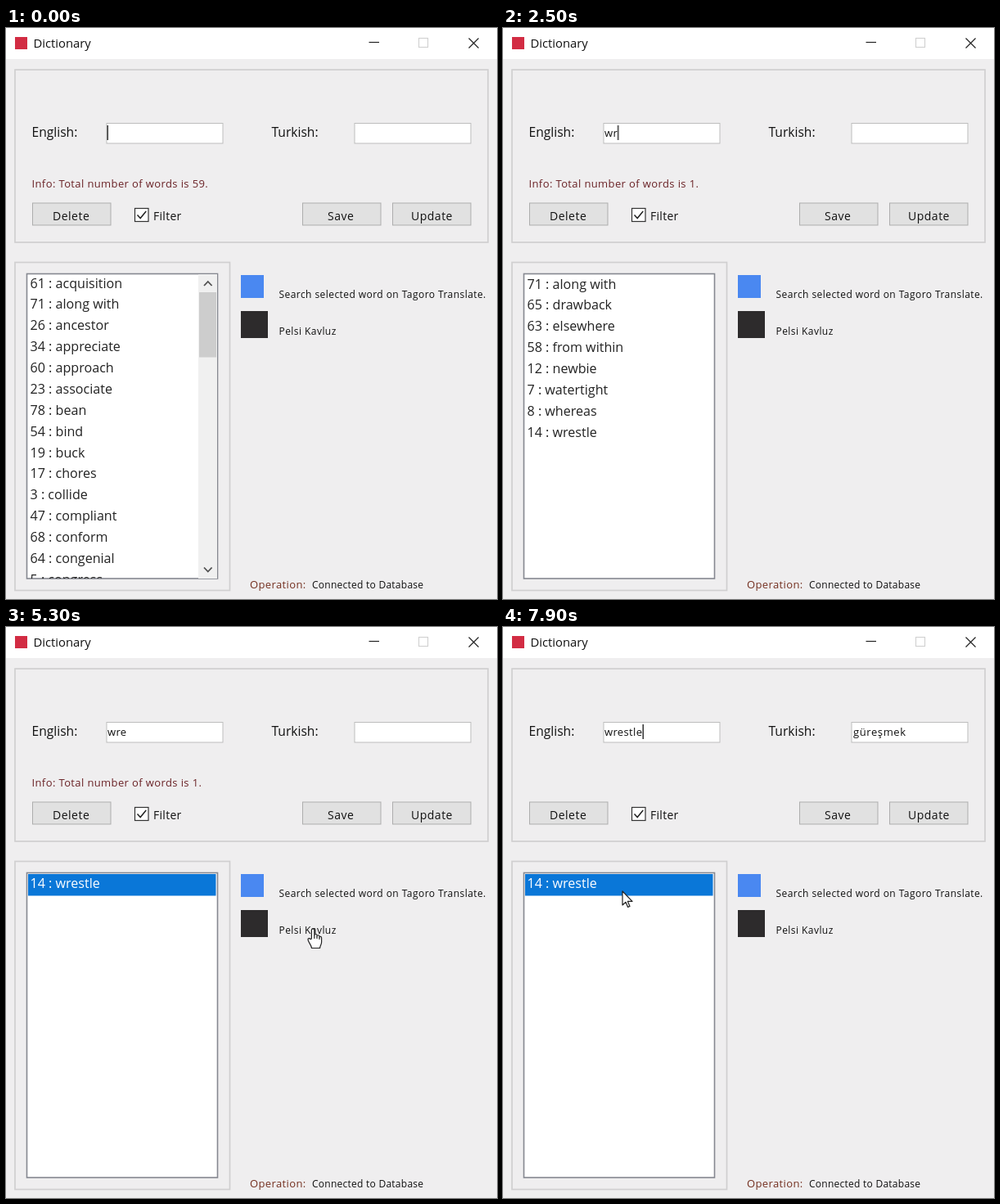
These frames come from a looping animation (600x698 px, 8 s). An HTML page:

```html
<!DOCTYPE html>
<html lang="en">
<head>
<meta charset="utf-8">
<title>Dictionary</title>
<style>
html, body { margin: 0; width: 100%; height: 100%; overflow: hidden; background: #efeeef; }
svg { display: block; width: 600px; height: 698px; }
text { font: 500 14px "Open Sans", "Noto Sans", sans-serif; fill: #111; }
.title { font-size: 14.8px; font-weight: 400; }
.label { font-size: 15.6px; }
.field { font-size: 13px; letter-spacing: .35px; }
.turkish { letter-spacing: .6px; }
.info { font-size: 13px; letter-spacing: .38px; fill: #6a2226; }
.operation { fill: #743020; }
.link { font-size: 12px; letter-spacing: .44px; }
.status { font-size: 12px; letter-spacing: .26px; }
.caption { letter-spacing: .5px; }
.check { letter-spacing: .3px; }
.rows text { font-size: 16.1px; font-weight: 400; fill: #222; }
.rows .on { fill: #fff; }
.panel { fill: none; stroke: #d0cfd0; stroke-width: 1.7; }
.input { fill: #fff; stroke: #bdbdbd; }
.button { fill: #e1e1e1; stroke: #adadad; }

/* Every clock runs 8 s; 1.25% is 100 ms */
.step { animation: 8s step-end infinite; }
.until-w { animation-name: until-w; }
.type-w { animation-name: type-w; }
.type-wr { animation-name: type-wr; }
.type-wre { animation-name: type-wre; }
.loaded { animation-name: loaded; }
.count-w { animation-name: count-w; }
.count-wr { animation-name: count-wr; }
.list-w { animation-name: list-w; }
.list-wr { animation-name: list-wr; }
.selected { animation-name: selected; }
.caret { animation-name: caret; }
.hand { animation-name: hand; }
.arrow { animation-name: arrow; }
.pointer { animation: move 8s linear infinite; }

@keyframes until-w { 0% { opacity: 1 } 25%, 100% { opacity: 0 } }
@keyframes type-w { 0% { opacity: 0 } 22.5% { opacity: 1 } 28.75%, 100% { opacity: 0 } }
@keyframes type-wr { 0% { opacity: 0 } 28.75% { opacity: 1 } 35%, 100% { opacity: 0 } }
@keyframes type-wre { 0% { opacity: 0 } 35% { opacity: 1 } 92.5%, 100% { opacity: 0 } }
@keyframes loaded { 0% { opacity: 0 } 92.5%, 100% { opacity: 1 } }
@keyframes count-w { 0% { opacity: 0 } 25% { opacity: 1 } 30%, 100% { opacity: 0 } }
@keyframes count-wr { 0% { opacity: 0 } 30% { opacity: 1 } 92.5%, 100% { opacity: 0 } }
@keyframes list-w { 0% { opacity: 0 } 25% { opacity: 1 } 32.5%, 100% { opacity: 0 } }
@keyframes list-wr { 0% { opacity: 0 } 32.5%, 100% { opacity: 1 } }
@keyframes selected { 0% { opacity: 0 } 61.25%, 100% { opacity: 1 } }
@keyframes caret {
  0%, 11.25% { opacity: 1; transform: translateX(124px) }
  5%, 17.5% { opacity: 0; transform: translateX(124px) }
  22.5% { opacity: 1; transform: translateX(134.5px) }
  28.75% { opacity: 1; transform: translateX(140.5px) }
  35%, 45%, 57.5%, 70%, 82.5% { opacity: 1; transform: translateX(148px) }
  38.75%, 51.25%, 63.75%, 76.25%, 88.75% { opacity: 0; transform: translateX(148px) }
  92.5%, 100% { opacity: 1; transform: translateX(171px) }
}
@keyframes hand { 0%, 50%, 69.4%, 100% { opacity: 0 } 47.5%, 64.4% { opacity: 1 } }
@keyframes arrow { 0%, 50%, 69.4%, 100% { opacity: 1 } 47.5%, 64.4% { opacity: 0 } }
@keyframes move {
  0%, 41.2% { transform: translate(398px, -40px) }
  42.5%, 43.75% { transform: translate(398px, -19px); animation-timing-function: ease-in-out }
  48%, 48.9% { transform: translate(397px, 367px); animation-timing-function: ease-in-out }
  55%, 56.25% { transform: translate(134px, 307px) }
  57.5%, 61.25% { transform: translate(136px, 309px); animation-timing-function: ease-in-out }
  66%, 67.5% { transform: translate(375px, 369px); animation-timing-function: ease-in-out }
  71.25%, 73.75% { transform: translate(378px, 389px); animation-timing-function: ease-in-out }
  79% { transform: translate(430px, 396px); animation-timing-function: ease-in-out }
  85%, 86.25% { transform: translate(437.5px, 381px); animation-timing-function: ease-in-out }
  91.25%, 92.5% { transform: translate(148px, 314px); animation-timing-function: ease-in-out }
  96.25% { transform: translate(124px, 323px); animation-timing-function: ease-out }
  98.75%, 100% { transform: translate(146px, 323px) }
}
</style>
</head>
<body>
<svg viewBox="0 0 600 698">
  <defs><clipPath id="box"><rect x="26" y="301" width="232" height="371.5"/></clipPath></defs>
  <rect width="600" height="698" fill="#efeeef"/>

  <rect width="600" height="38" fill="#fff"/>
  <rect x="11" y="11" width="15" height="15" fill="#d22c43"/>
  <text class="title" x="33.5" y="24">Dictionary</text>
  <g fill="none" stroke="#222" stroke-width="1.2">
    <path d="M443.5 17.5H456"/>
    <rect x="504.5" y="12.5" width="11" height="11" stroke="#d2d2d2"/>
    <path d="M565.5 12.5l12 12m0-12l-12 12"/>
  </g>

  <rect class="panel" x="11" y="51" width="578" height="211"/>
  <rect class="panel" x="11" y="286.5" width="262.5" height="401"/>

  <text class="label" x="31.5" y="133">English:</text>
  <text class="label" x="324.5" y="133">Turkish:</text>
  <rect class="input" x="123" y="116.5" width="142" height="24.5"/>
  <rect class="input" x="426" y="116.5" width="142" height="24.5"/>
  <text class="field step type-w" x="124" y="133">w</text>
  <text class="field step type-wr" x="124" y="133">wr</text>
  <text class="field step type-wre" x="124" y="133">wre</text>
  <g class="step loaded">
    <text class="field" x="124" y="133">wrestle</text>
    <text class="field turkish" x="428" y="133">güreşmek</text>
  </g>
  <rect class="step caret" x="-.5" y="119" width="1.4" height="18" fill="#222"/>

  <text class="info step until-w" x="31.5" y="195">Info: Total number of words is 59.</text>
  <text class="info step count-w" x="31.5" y="195">Info: Total number of words is 8.</text>
  <text class="info step count-wr" x="31.5" y="195">Info: Total number of words is 1.</text>

  <rect class="button" x="32.5" y="214" width="95.5" height="27"/>
  <rect class="button" x="362.5" y="214" width="95.5" height="27"/>
  <rect class="button" x="472.5" y="214" width="95.5" height="27"/>
  <text class="caption" x="57" y="234.5">Delete</text>
  <text class="caption" x="393" y="234.5">Save</text>
  <text class="caption" x="495" y="234.5">Update</text>
  <rect x="157.5" y="220.5" width="16.5" height="16" fill="#fff" stroke="#333" stroke-width="1.2"/>
  <path d="M160.5 228.5l3.7 4 7-8.5" fill="none" stroke="#222" stroke-width="1.5"/>
  <text class="check" x="180" y="234.5">Filter</text>

  <rect x="25.5" y="300.5" width="233" height="372.5" fill="#fff" stroke="#858890" stroke-width="1.6"/>
  <g class="step until-w" clip-path="url(#box)">
    <g class="rows" id="all"></g>
    <rect x="235" y="301" width="23" height="372" fill="#f0f0f0"/>
    <rect x="236" y="323" width="21" height="79.5" fill="#cdcdcd"/>
    <path d="M242 315l4.8-5 4.8 5M242 659.5l4.8 5 4.8-5" fill="none" stroke="#505050" stroke-width="1.8"/>
  </g>
  <g class="rows step list-w" id="some"></g>
  <g class="rows step list-wr" id="one"></g>
  <g class="rows step selected">
    <rect x="27" y="302" width="229.5" height="26.5" fill="#0a77d8"/>
    <text class="on" x="29.5" y="318.5">14 : wrestle</text>
  </g>

  <rect x="287" y="302" width="28" height="28" fill="#4a88f1"/>
  <text class="link" x="333.5" y="329.5">Search selected word on Tagoro Translate.</text>
  <rect x="287" y="346" width="33" height="33" fill="#2d2b2c"/>
  <text class="link" x="333.5" y="375">Pelsi Kavluz</text>
  <text class="info operation" x="298" y="685">Operation:</text>
  <text class="status" x="374" y="685">Connected to Database</text>

  <g class="pointer" fill="#fff" stroke="#222" stroke-width="1.2" stroke-linejoin="round">
    <path class="step arrow" d="M0 0V17L4 13.3 6.6 19.4 9 18.4 6.4 12.4H12Z"/>
    <g class="step hand">
      <path d="M-1.6 12V1.5a1.7 1.7 0 0 1 3.4 0V8c0-2 3.2-2 3.2 0v1c.3-1.8 3-1.6 3 .3v1c.4-1.6 2.6-1.3 2.6.6V16c0 4-2 4.5-2 7.5H-1.5C-1.5 20-6 16-6 13c0-1.8 2.2-2 3.2-.3Z"/>
      <path d="M1.8 8v4M5 9v3M8 10.3V13" fill="none"/>
    </g>
  </g>
</svg>
<script>
const words = `61 acquisition,71 along with,26 ancestor,34 appreciate,60 approach,
23 associate,78 bean,54 bind,19 buck,17 chores,3 collide,47 compliant,68 conform,
64 congenial,5 congress`;
const matches = '71 along with,65 drawback,63 elsewhere,58 from within,12 newbie,7 watertight,8 whereas,14 wrestle';

function fill(id, list, top) {
  document.getElementById(id).innerHTML = list.split(',').map((row, i) =>
    `<text x="29.5" y="${top + i * 25.88}">${row.trim().replace(' ', ' : ')}</text>`).join('');
}
fill('all', words, 317.5);
fill('some', matches, 318.5);
fill('one', '14 wrestle', 318.5);
</script>
</body>
</html>
```
